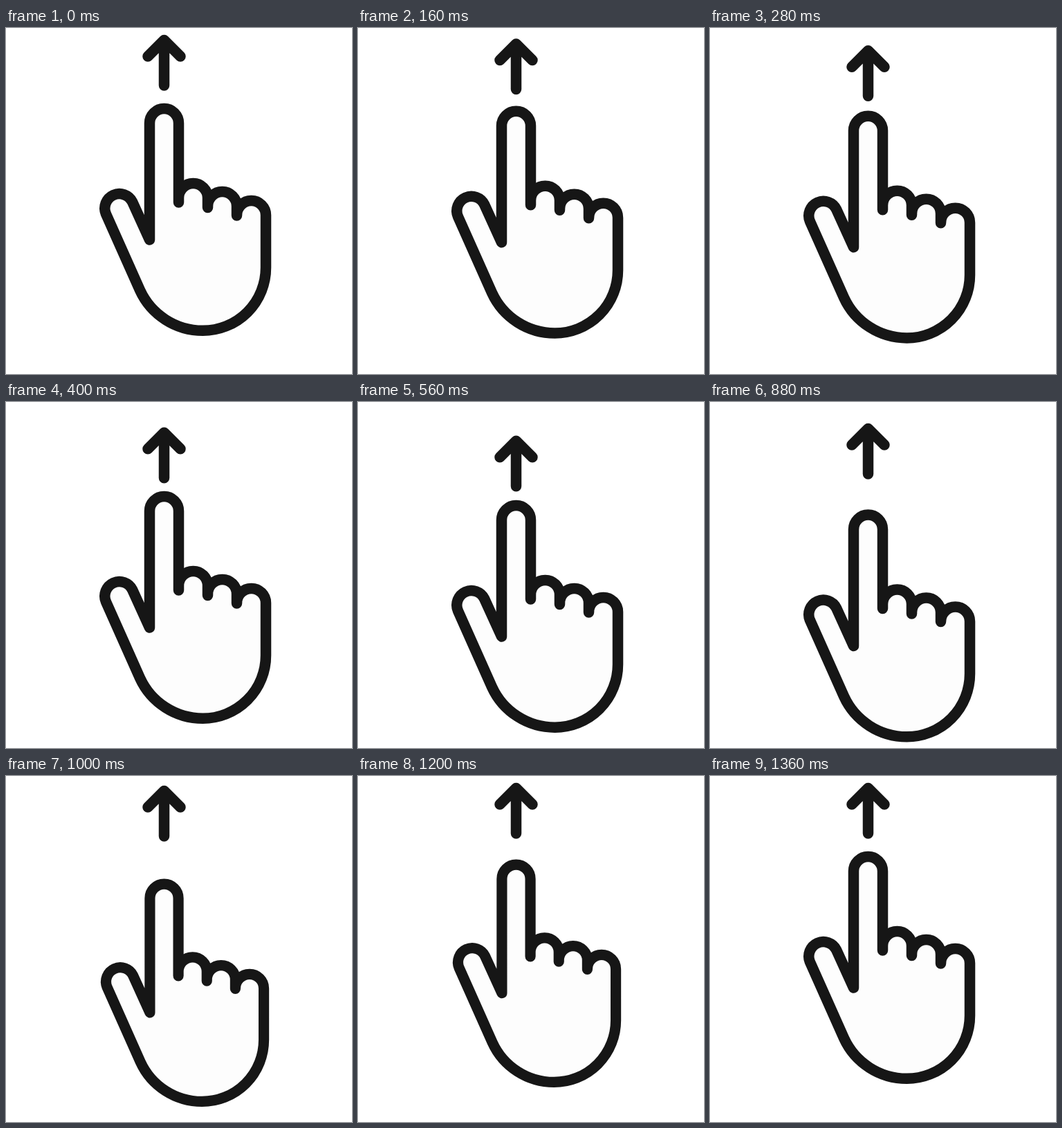
Write an HTML page that moves like this. It is 500x500 px and loops after 2080 ms.

```html
<!DOCTYPE html>
<html lang="en">
<head>
<meta charset="utf-8">
<title>Swipe up</title>
<style>
  html, body { margin: 0; width: 100%; height: 100%; overflow: hidden; background: #fff; }
  svg { display: block; width: 100%; height: 100%; }
</style>
</head>
<body>
<svg viewBox="0 0 500 500" stroke="#161616" stroke-width="15.5" stroke-linecap="round" stroke-linejoin="round">
  <path id="arrow" fill="none" d="M228.5 83V17.5M205 41L228.5 17.5L252 41"/>
  <path id="hand" fill="#fdfdfd" d="M207.5 306V137.6a21 21 0 0 1 42 0V252V245.5
    a21 21 0 0 1 42 0V259.5V257.5
    a21 21 0 0 1 42 0V271V270.5
    a21 21 0 0 1 42 0V346.3
    A91 91 0 0 1 284.5 437.3
    A100 100 0 0 1 193.5 378.8
    L144.4 268.7
    A21 21 0 0 1 182.6 251.3Z"/>
</svg>
<script>
  const LOOP = 2080, STEP = 40;
  const PIVOT_X = 228.5, PIVOT_Y = 110;
  const arrow = document.getElementById('arrow');
  const hand = document.getElementById('hand');

  const progress = (t, from, to) => Math.min(1, Math.max(0, (t - from) / (to - from)));
  const ease = (t, from, to) => (1 - Math.cos(Math.PI * progress(t, from, to))) / 2;

  function draw(t) {
    const arrowY = 42 * (ease(t, 0, 680) - ease(t, 680, 1080));
    const handY = 46.5 * (ease(t, 0, 880) - ease(t, 880, 1360));
    const scale = 1 - 0.02 * (ease(t, 880, 1000) - ease(t, 1200, 1360));
    arrow.setAttribute('transform', `translate(0 ${arrowY})`);
    hand.setAttribute('transform',
      `translate(${PIVOT_X} ${PIVOT_Y + handY}) scale(${scale}) translate(${-PIVOT_X} ${-PIVOT_Y})`);
  }

  const start = performance.now();
  function tick() {
    const t = (performance.now() - start) % LOOP;
    draw(Math.floor(t / STEP) * STEP);
    requestAnimationFrame(tick);
  }
  tick();
</script>
</body>
</html>
```
